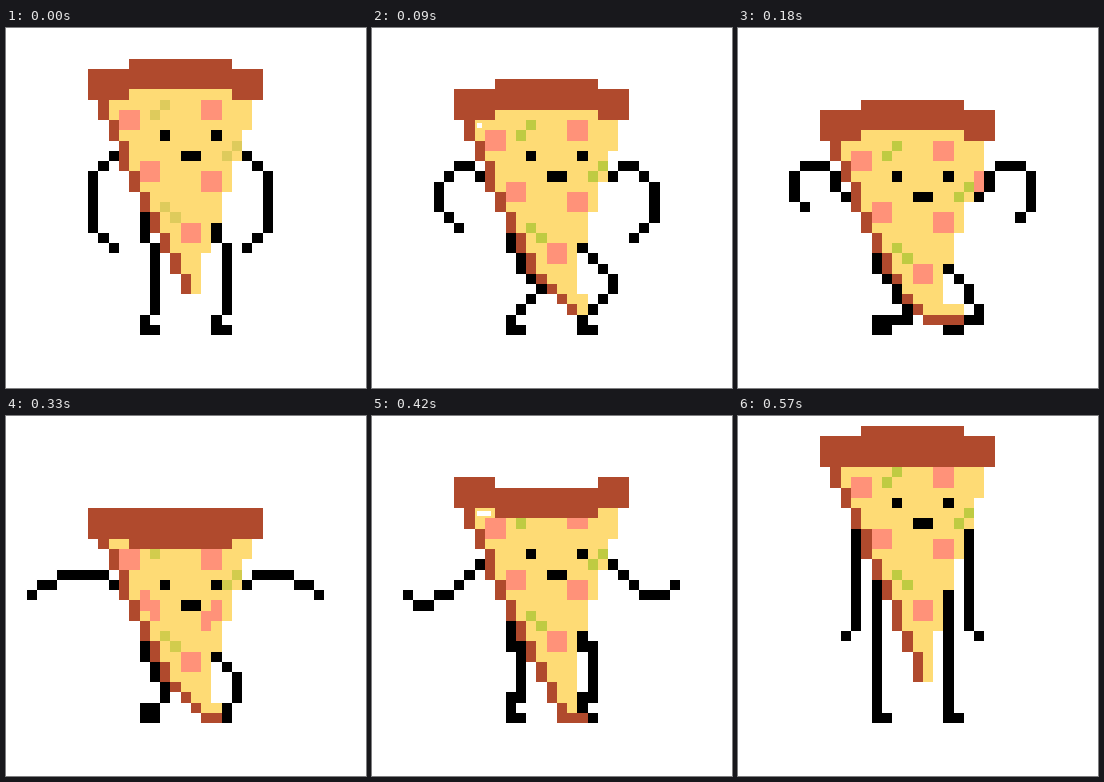
Recreate the animation shown at these times as an HTML page with a canvas. Size 360 by 360 pixels, loop 0.63 s.

```html
<!DOCTYPE html>
<html>
<head>
<meta charset="utf-8">
<style>
html, body { margin: 0; height: 100%; overflow: hidden; background: #fff; }
canvas { display: block; width: 100vw; height: 100vh; image-rendering: pixelated; }
</style>
</head>
<body>
<canvas width="360" height="360"></canvas>
<script>
const ctx = document.querySelector('canvas').getContext('2d');
const LOOP = 630;
const CRUST = '#b04a2d', CHEESE = '#fedb75', HAM = '#ff9279', INK = '#000';

const px = x => Math.round(x * 10.27);
const py = y => Math.round(y * 10.24);
function box(color, x, y, w = 1, h = 1) {
  ctx.fillStyle = color;
  ctx.fillRect(px(x), py(y), px(x + w) - px(x), py(y + h) - py(y));
}

// Joins "x,y x,y ..." joints, each stretch going straight first, then diagonally
function limb(path, mirror) {
  const joints = path.split(' ').map(p => p.split(',').map(Number));
  let [x, y] = joints[0];
  const dot = () => box(INK, mirror ? 33 - x : x, y);
  dot();
  for (const [tx, ty] of joints) {
    while (x !== tx || y !== ty) {
      const dx = tx - x, dy = ty - y, wide = Math.abs(dx), tall = Math.abs(dy);
      if (wide >= tall) x += Math.sign(dx);
      if (tall >= wide) y += Math.sign(dy);
      dot();
    }
  }
}

const foot = x => `${x},28 ${x},29 ${x + 1},29`;
const standing = ['14,21 ' + foot(13), '21,21 ' + foot(20)];
const kneeling = ['14,24 15,26 14,28 ' + foot(13), '22,25 21,28 21,29'];

// y: body offset, nod: extra drop of the face, mid: crust middle [offset, height],
// h: slice height, toe: column of the slice's tip; a second arm is given mirrored
const poses = [
  { at: 0, y: 0, green: '#decb5c', arms: ['10,12 8,14 10,21'], legs: standing },
  { at: 30, y: 1, bend: true, toe: 19, arms: ['10,13 9,13 7,15 9,20'],
    legs: ['14,21 15,24 ' + foot(13), '22,22 ' + foot(20)] },
  { at: 90, y: 2, bend: true, toe: 20, shine: .5,
    arms: ['10,14 9,13 6,15 8,19', '10,14 9,13 6,15 8,20'],
    legs: ['14,22 16,25 ' + foot(13), '23,24 ' + foot(20)] },
  { at: 180, y: 4, bend: true, toe: 21, h: 18, elbow: HAM,
    arms: ['10,16 9,15 8,13 5,14 6,17', '10,16 9,15 8,13 5,14 6,18'],
    legs: ['15,25 16,27 16,28 ' + foot(13), '22,25 23,27 23,28 22,28 21,29 20,29'] },
  { at: 240, y: 4, nod: 1, mid: [0, 4], bend: true, toe: 20,
    arms: ['10,16 8,14 3,16 3,17'], legs: kneeling },
  { at: 330, y: 4, nod: 2, mid: [0, 4], bend: true, toe: 20, green: '#d2cc4d',
    arms: ['10,16 9,15 4,16 2,17', '10,16 9,15 5,16 3,17'], legs: kneeling },
  { at: 420, y: 2, nod: 1, mid: [1, 3], toe: 20, h: 21, shine: 1.3,
    arms: ['10,14 7,17 5,18 3,17', '10,14 7,17 4,16'],
    legs: ['13,22 14,22 14,27 13,27 ' + foot(13), '20,22 21,22 21,27 20,27 20,28 21,29'] },
  { at: 480, y: 0, mid: [-1, 4], arms: ['10,12 7,15 4,19', '10,12 7,15 6,18'], legs: standing },
  { at: 570, y: -2, mid: [-1, 4], stretch: 2, arms: ['11,11 10,21'], legs: [foot(13), foot(20)] }
];

function slice({ y, bend, stretch = 0, h = 19 + stretch, toe = 18 }) {
  const row = 7 + y, tip = toe > 18 ? h - 2 : h * .75;
  const onFloor = row + h > 28;
  box(CHEESE, 12, row - 1, 10);
  for (let k = 0; k < h; k++) {
    const slope = (k + .25 + stretch * .4) * 9 / (19 + stretch);
    const left = Math.min(toe - 1, bend && k > 14 ? k + 1 : 9 + Math.floor(slope));
    const right = k >= tip ? toe : Math.max(20, 23 - Math.floor(k / 3)) - (k > 12);
    box(CHEESE, left, row + k, right - left + 1);
    box(CRUST, left, row + k, onFloor && k === h - 1 ? right - left + 1 : 1);
  }
}

function toppings({ y, nod = 0, stretch = 0, green = '#bfcb42' }) {
  const sag = nod >> 1;
  const ham = (x, top, left = 0, right = left) => {
    box(HAM, x, top + y + left, 1, 2);
    box(HAM, x + 1, top + y + right, 1, 2);
  };
  const leaves = (x, top, dir) => {
    box(green, x, top + y);
    box(green, x + dir, top + y + 1);
  };
  ham(11, 8, sag);
  ham(19, 7, 2 * sag);
  ham(13, 13, 0, sag);
  ham(19, 14, sag, 0);
  ham(17, 19, stretch / 2);
  leaves(15, 7 + sag, -1);
  leaves(22, 11, -1);
  leaves(15, 17, 1);
}

function draw(pose) {
  const { y, nod = 0, mid: [lift, thick] = [-1, 3], shine, elbow, arms, legs } = pose;
  const brim = 4 + y + (nod >> 1), eyes = 10 + y + nod;
  ctx.fillStyle = '#fff';
  ctx.fillRect(0, 0, 360, 360);
  slice(pose);
  toppings(pose);
  if (elbow) box(elbow, 23, 10 + y, 1, 2);

  box(CRUST, 8, brim, 4, 3);
  box(CRUST, 12, brim + lift, 10, thick);
  box(CRUST, 22, brim, 3, 3);
  if (shine) box('#fff', 10.25, 7.25 + y, shine, .5);

  box(INK, 15, eyes);
  box(INK, 20, eyes);
  box(INK, 17, eyes + 2, 2);

  const [leftArm, rightArm = leftArm] = arms;
  limb(leftArm);
  limb(rightArm, true);
  limb(`13,${18 + y} ${legs[0]}`);
  limb(`20,${19 + y} ${legs[1]}`);
}

const start = performance.now();
function tick() {
  const t = (performance.now() - start) % LOOP;
  draw(poses.findLast(p => p.at <= t));
  requestAnimationFrame(tick);
}
tick();
</script>
</body>
</html>
```
